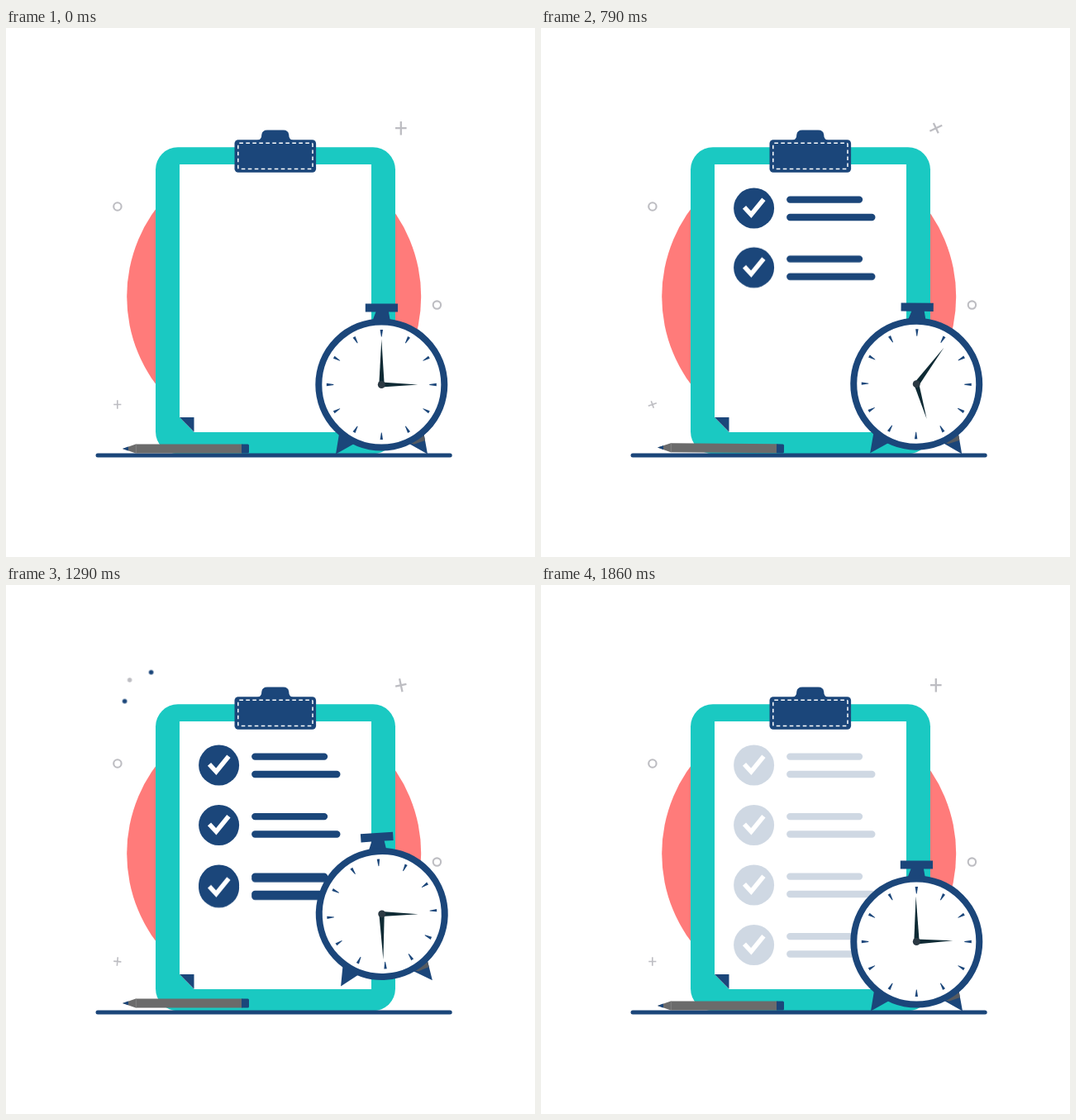
An HTML page for the animation above (1930 ms loop, 640 by 640 pixels).

```html
<!DOCTYPE html>
<html lang="en">
<head>
<meta charset="utf-8">
<title>Checklist and clock</title>
<style>
  :root { --k: 0; --navy: #1b467a; --teal: #1ac9c2; --grey: #bdbdc2; --pencil: #6b6b6b; --ink: #0e2a34; }
  html, body { margin: 0; width: 100%; height: 100%; overflow: hidden; background: #fff; }
  svg { display: block; width: 100vw; height: 100vh; }
  .navy { fill: var(--navy); }
  .line { fill: none; stroke: var(--grey); }

  /* One second of CSS time is one step of the 27-step loop; --k picks the step. */
  .move {
    animation: 27s cubic-bezier(.333, 0, .667, 1) calc(var(--k) * -1s) infinite paused;
  }

  #clock { transform-origin: 454.3px 424.5px; animation-name: hover, sway; }
  @keyframes hover {
    0%, 38.89% { translate: 0 0; }
    59.26%, 78.89% { translate: 0 -33.5px; }
    96.3%, 100% { translate: 0 0; }
  }
  @keyframes sway {
    0%, 38.89% { rotate: 0deg; }
    49.26% { rotate: 6.2deg; }
    62.96% { rotate: -4.3deg; }
    79.63%, 100% { rotate: 0deg; }
  }

  .hand { fill: var(--ink); animation-name: sweep; animation-timing-function: cubic-bezier(.92, 0, .52, 1); }
  @keyframes sweep {
    from { rotate: var(--from); }
    to { rotate: var(--to); }
  }

  #pen { transform-origin: 217.5px 509px; animation-name: toss, tip; }
  @keyframes toss {
    0%, 38.89% { translate: 0 0; }
    52.59% { translate: 0 -15.6px; }
    72.22%, 100% { translate: 0 0; }
  }
  @keyframes tip {
    0%, 38.89% { rotate: 0deg; }
    51.85% { rotate: 9.3deg; }
    66.67%, 100% { rotate: 0deg; }
  }

  .dot { animation-name: burst; }
  @keyframes burst {
    0%, 44.44% { translate: 0 0; opacity: 0; }
    45% { opacity: 1; }
    59.26%, 100% { translate: var(--x) var(--y); }
    66.67% { scale: 1; }
    76%, 100% { scale: 0; opacity: 1; }
  }

  .plus { animation-timing-function: linear; }
  #big { animation-name: spin-big; }
  #small { animation-name: spin-small; }
  @keyframes spin-big {
    0% { rotate: 0deg; }
    18.52% { rotate: 11deg; }
    33.33% { rotate: 45deg; }
    51.85% { rotate: 94deg; }
    66.67% { rotate: 168deg; }
    85.19%, 100% { rotate: 180deg; }
  }
  @keyframes spin-small {
    0% { rotate: 0deg; }
    18.52% { rotate: 12deg; }
    33.33% { rotate: 42deg; }
    51.85% { rotate: 114deg; }
    66.67% { rotate: 185deg; }
    85.19%, 100% { rotate: 180deg; }
  }

  #list { animation-name: fade; animation-timing-function: linear; }
  @keyframes fade {
    0%, 86.3% { opacity: 1; }
    98.9%, 100% { opacity: 0; }
  }
  .item {
    animation: drop 3.4s cubic-bezier(.333, 0, .667, 1) calc((var(--start) - var(--k)) * 1s) both paused;
  }
  @keyframes drop {
    from { translate: 0 -72.5px; opacity: 0; }
    1% { opacity: 1; }
    to { translate: 0 0; opacity: 1; }
  }
</style>
</head>
<body>
<svg viewBox="0 0 640 640">
  <defs>
    <clipPath id="paper"><rect x="210" y="165" width="232" height="324"/></clipPath>
    <path id="tick" class="navy" d="M-1.7 -66.5H1.7L.4 -58H-.4Z"/>
    <g id="entry">
      <circle class="navy" cx="257.6" cy="218" r="24.5"/>
      <path d="M246 216.8L254.3 225.8L269.4 207.2" fill="none" stroke="#fff" stroke-width="5.6"/>
      <path d="M301.3 207.6H385M301.3 229H400.3" stroke="#1b467a" stroke-width="8.4" stroke-linecap="round"/>
    </g>
  </defs>

  <circle cx="324.2" cy="325" r="178" fill="#ff7b7a"/>

  <g class="line" stroke-width="2.1">
    <circle cx="134.9" cy="216" r="4.7"/>
    <circle cx="521.4" cy="335.1" r="4.7"/>
    <g transform="translate(477.8 121.2)"><path id="big" class="move plus" d="M-6.8 0H6.8M0 -8.2V8.2" stroke-width="2.3"/></g>
    <g transform="translate(134.8 455.5)"><path id="small" class="move plus" d="M-4.6 0H4.6M0 -5.3V5.3" stroke-width="1.6"/></g>
  </g>

  <g transform="translate(175.6 140.6)">
    <circle class="move dot" r="2.7" fill="#bdbdc2" style="--x:-26px;--y:-25.7px"/>
    <circle class="move dot navy" r="2.8" style="--x:0px;--y:-35px"/>
    <circle class="move dot navy" r="2.8" style="--x:-32px;--y:0px"/>
  </g>

  <rect x="181" y="144.3" width="290" height="371" rx="27" fill="#1ac9c2"/>
  <path d="M210 165H442V489H227.5L210 471Z" fill="#fff"/>
  <path class="navy" d="M210 471H227.5V488.7Z"/>

  <g clip-path="url(#paper)"><g id="list" class="move"></g></g>

  <path class="navy" d="M304 136Q309.3 135 309.3 129Q310 123.5 316 123.5H335.5Q341.5 123.5 342.2 129Q342.2 135 347.5 136Z"/>
  <rect class="navy" x="276.5" y="135.2" width="98.6" height="39.6" rx="4.5"/>
  <rect x="280.8" y="139.2" width="90.2" height="31.4" rx="1.5" fill="none" stroke="#fff" stroke-width="1.5" stroke-dasharray="4.6 3.4"/>

  <path d="M111 517H537.2" stroke="#1b467a" stroke-width="5" stroke-linecap="round"/>

  <g id="pen" class="move">
    <path d="M141 509L157 503.5H286V514.5H157Z" fill="#6b6b6b"/>
    <path d="M157.3 503.5V514.5" stroke="#8d8d8d" stroke-width=".7"/>
    <path class="navy" d="M141 509L148 506.6V511.4Z"/>
    <path class="navy" d="M285 503.5H292.5Q294 503.5 294 505V513Q294 514.5 292.5 514.5H285Z"/>
  </g>

  <g id="clock" class="move">
    <path class="navy" d="M434.8 333.4H474V343.5H463L465 355H443L447.5 343.5H434.8Z"/>
    <path class="navy" d="M403.5 488L399 515.5L422 502.5ZM505 488L510 515.5L487 502.5Z"/>
    <path d="M488 502.5L505.2 490L507 499L494 503.5Z" fill="#555a60"/>
    <g transform="translate(454.3 431.5)">
      <circle r="76" fill="#fff" stroke="#1b467a" stroke-width="8"/>
      <g id="ticks"></g>
      <path class="move hand" d="M-3 0L0 -55L3.4 0Z" style="--from:0deg;--to:360deg"/>
      <path class="move hand" d="M-3 0L0 -44L3 0Z" style="--from:90deg;--to:810deg"/>
      <circle r="4.5" fill="#2b3943"/>
    </g>
  </g>
</svg>
<script>
  const LOOP = 1930, STEPS = 27;
  const $ = id => document.getElementById(id);

  $('ticks').innerHTML = Array.from({ length: 12 }, (_, i) =>
    `<use href="#tick" transform="rotate(${i * 30})"/>`).join('');

  $('list').innerHTML = [1.8, 7.8, 13.2, 17.6].map((start, i) =>
    `<g transform="translate(0 ${i * 72.5})"><g class="item" style="--start:${start}"><use href="#entry"/></g></g>`).join('');

  // Motion advances in even steps; 5 ms covers the rounding of step times.
  function draw() {
    const t = performance.now() % LOOP;
    const k = Math.floor((t + 5) / LOOP * STEPS) % STEPS;
    document.documentElement.style.setProperty('--k', k);
    requestAnimationFrame(draw);
  }
  draw();
</script>
</body>
</html>
```
